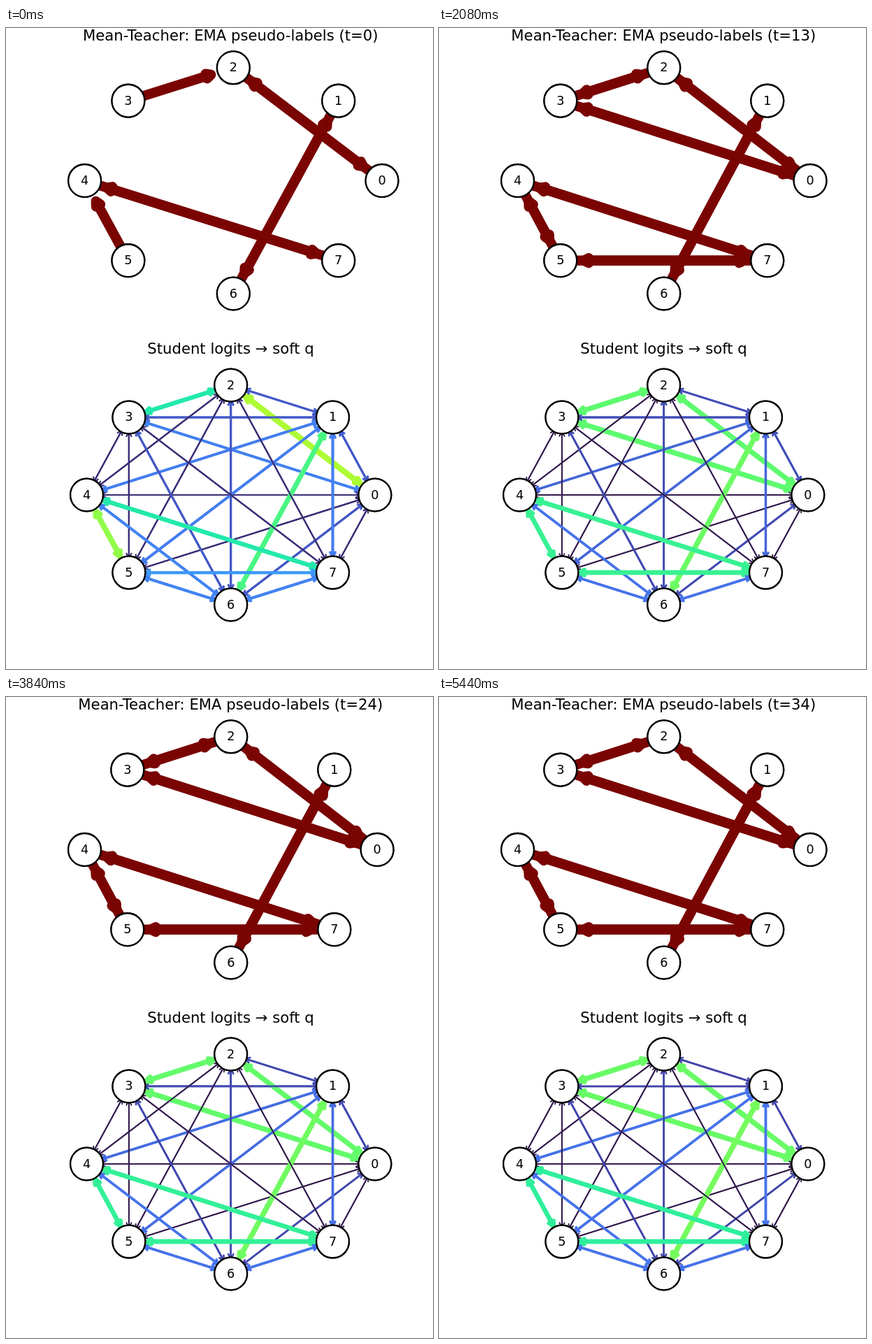
An HTML page with a canvas that plays this animation: 611x917 px, repeating every 5600 ms.

```html
<!DOCTYPE html>
<html lang="en">
<head>
<meta charset="utf-8">
<title>Mean-Teacher graph</title>
<style>
  html, body { margin: 0; width: 100%; height: 100%; overflow: hidden; background: #fff; }
  canvas { display: block; }
</style>
</head>
<body>
<canvas id="stage" width="611" height="917"></canvas>
<script>
const ctx = document.getElementById('stage').getContext('2d');
const PT = 1.767;            // pixels per typographic point
const STEP = 160, COUNT = 35;
const SETTLE = 2;            // step at which the teacher's links become mutual
const RED = '#7a0402';

// Lower half of the Turbo colour map, a stop every 1/14
const turbo = ['30123b', '4145ab', '4675ed', '39a2fc', '1bcfd4', '24eca6', '61fc6c', 'a4fc3b']
  .map(h => [0, 2, 4].map(i => parseInt(h.slice(i, i + 2), 16)));

// Clusters: triangles a and b, and the pair 1-6 that bridges them
const cluster = '0a 1p 2a 3a 4b 5b 6q 7b'.split(' ').map(s => s[1]);
// Mean weight and swing of the links between two clusters
const bonds = {
  aa: [.425, .012], bb: [.38, -.01], pq: [.44, .01], ab: [.012, 0],
  ap: [.085, -.015], bp: [.12, .02], aq: [.08, -.01], bq: [.14, 0]
};
// Weights of the strong links before training
const start = { '02': .51, '03': .16, '16': .4, '23': .35, '45': .48, '47': .35, '57': .2 };

const mix = (a, b, f) => a + (b - a) * f;

function color(v) {
  const p = v * 14, i = Math.min(6, Math.floor(p));
  return `rgb(${turbo[i].map((c, k) => Math.round(mix(c, turbo[i + 1][k], p - i)))})`;
}

function weight(i, j, t) {
  const [mean, swing] = bonds[[cluster[i], cluster[j]].sort().join('')];
  const steady = mean + swing * Math.cos((t - 10) * Math.PI / 6);
  const first = start['' + Math.min(i, j) + Math.max(i, j)] ?? steady + .025;
  return mix(first, steady, Math.min(1, t / 5));
}

function ring(cx, cy, rx, ry) {
  return Array.from({ length: 8 }, (_, i) =>
    [cx + rx * Math.cos(i * Math.PI / 4), cy - ry * Math.sin(i * Math.PI / 4)]);
}

function arrow([ax, ay], [bx, by], v, paint) {
  const len = Math.hypot(bx - ax, by - ay);
  const width = PT * (1 + 7 * v);
  const margin = 10 * PT;
  const tip = len - margin - width * Math.sqrt(5) / 2;
  const back = tip - 4 * PT, half = 2 * PT;
  ctx.save();
  ctx.translate(ax, ay);
  ctx.rotate(Math.atan2(by - ay, bx - ax));
  ctx.strokeStyle = paint;
  ctx.lineWidth = width;
  ctx.lineCap = ctx.lineJoin = 'round';
  ctx.beginPath();
  ctx.moveTo(margin, 0);
  ctx.lineTo(tip, 0);
  ctx.moveTo(back, -half);
  ctx.lineTo(tip, 0);
  ctx.lineTo(back, half);
  ctx.stroke();
  ctx.restore();
}

function text(s, x, y, size) {
  ctx.font = `${size}px "DejaVu Sans", sans-serif`;
  ctx.textAlign = 'center';
  ctx.fillStyle = '#000';
  ctx.fillText(s, x, y);
}

function node([x, y], label) {
  ctx.beginPath();
  ctx.arc(x, y, 23.4, 0, 2 * Math.PI);
  ctx.fillStyle = '#fff';
  ctx.fill();
  ctx.strokeStyle = '#000';
  ctx.lineWidth = 2.3;
  ctx.stroke();
  text(label, x, y + 5.5, 10 * PT);
}

// Two passes give the outlines and digits their firm edges
function nodes(points) {
  points.forEach(node);
  points.forEach(node);
}

function draw(t) {
  ctx.fillStyle = '#fff';
  ctx.fillRect(0, 0, 611, 917);

  const early = t < SETTLE;
  const top = early ? ring(325.3, 218.4, 212.7, 161.6) : ring(321.8, 218.4, 209.3, 161.6);
  const links = early ? '02 20 16 61 32 47 74 54'
    : '02 20 03 30 23 32 16 61 45 54 47 74 57 75';
  for (const [i, j] of links.split(' ')) arrow(top[i], top[j], 1, RED);
  nodes(top);
  text(`Mean-Teacher: EMA pseudo-labels (t=${t})`, 321.3, 18, 12 * PT);

  const low = ring(321.7, 668, 206.2, 157);
  for (let i = 0; i < 8; i++)
    for (let j = 0; j < 8; j++) {
      if (i === j) continue;
      const v = weight(i, j, t);
      arrow(low[i], low[j], v, color(v));
    }
  nodes(low);
  text('Student logits → soft q', 321.5, 466, 12 * PT);
}

function tick() {
  draw(Math.floor(performance.now() / STEP) % COUNT);
  requestAnimationFrame(tick);
}
tick();
</script>
</body>
</html>
```
